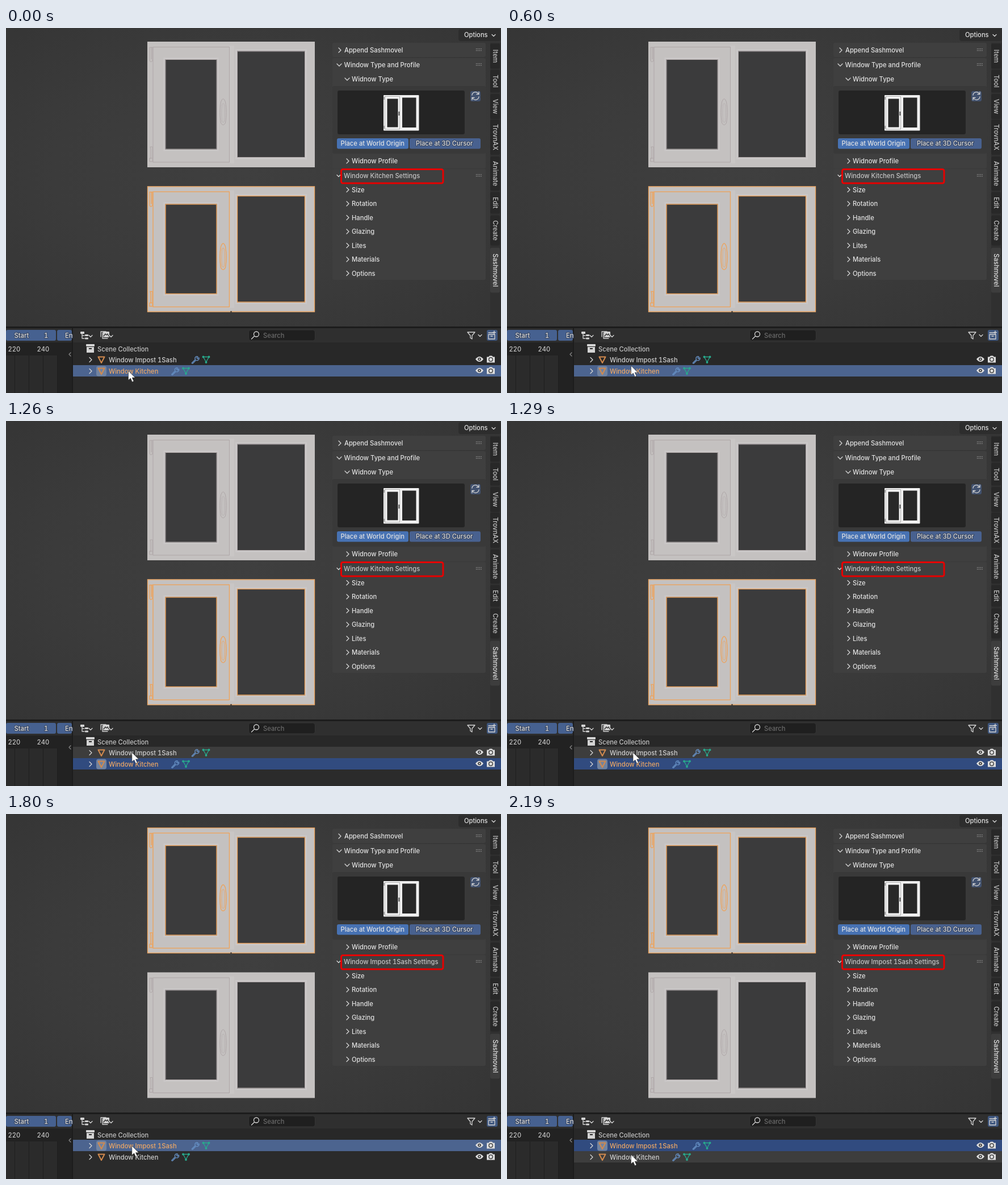
Animation of 872 by 642 pixels, one loop 2.22 s. Source, as an HTML page:

```html
<!DOCTYPE html>
<html lang="en">
<head>
<meta charset="utf-8">
<title>Window settings panel</title>
<style>
html, body { margin: 0; width: 100%; height: 100%; overflow: hidden; background: #3a3a3a; }
svg { display: block; width: 872px; height: 642px; }
text { font: 450 11.2px Inter, sans-serif; font-variant-numeric: tabular-nums; fill: #e2e2e2; white-space: pre; }
.dim { fill: #c4c4c4; }
.shaded { fill: #dcdcdc; stroke: #36445f; stroke-width: 2px; paint-order: stroke; }
.icon { fill: none; stroke: #d4d4d4; stroke-width: 1.3; stroke-linecap: round; stroke-linejoin: round; }
.edge { fill: none; stroke: #aea6a7; stroke-width: 1; }
.inner { opacity: .6; }
.outer, .origin { visibility: hidden; }
.selected .edge { stroke: #eca45f; stroke-width: 1.4; }
.selected .outer, .selected .origin { visibility: visible; }
.row .name { fill: #d0d0d0; }
.row .badge { visibility: hidden; }
.row.selected .name { fill: #eda765; }
.row.selected .badge { visibility: visible; }
</style>
</head>
<body>
<svg id="stage" viewBox="0 0 872 642" xmlns="http://www.w3.org/2000/svg">
  <defs>
    <radialGradient id="view" cx="48%" cy="48%" r="70%">
      <stop offset="0" stop-color="#3f3f3f"/><stop offset=".55" stop-color="#3b3b3b"/><stop offset="1" stop-color="#353535"/>
    </radialGradient>
  </defs>
</svg>
<script>
const stage = document.getElementById('stage');
const LOOP = 2220, STEP = 30, CLICK = 1320, ROW_SPLIT = 593.8;

function add(tag, attrs, parent = stage, content = '') {
  const el = document.createElementNS('http://www.w3.org/2000/svg', tag);
  for (const key in attrs) el.setAttribute(key, attrs[key]);
  el.textContent = content;
  parent.append(el);
  return el;
}
const rect = (x, y, width, height, fill, rx = 0, parent = stage) =>
  add('rect', { x, y, width, height, fill, rx }, parent);
const label = (x, middle, content, cls = '', parent = stage) =>
  add('text', { x, y: middle + 4, class: cls }, parent, content);
const icon = (d, stroke = '#d4d4d4', parent = stage) =>
  add('path', { d, class: 'icon', style: `stroke:${stroke}` }, parent);
const right = (x, y, parent = stage) => icon(`M${x - 2} ${y - 4}l4 4-4 4`, '#d4d4d4', parent);
const down = (x, y) => icon(`M${x - 4} ${y - 2}l4 4 4-4`);
const down3 = (x, y) => icon(`M${x - 3} ${y - 1.5}l3 3 3-3`);

function drawWindow(top) {
  const g = add('g', { transform: `translate(249 ${top})` });
  const edge = (x, y, width, height, cls = 'edge') =>
    add('rect', { x, y, width, height, class: cls }, g);
  rect(0, 0, 295, 221, '#c4c1c0', 0, g);
  rect(144, 7, 9, 207, '#c9c6c5', 0, g);
  for (const [x, y, w, h] of [[31.5, 31, 91, 158.5], [158, 16.5, 120, 187.5]]) {
    rect(x - 3, y - 3, w + 6, h + 6, '#cac7c7', 0, g);
    rect(x, y, w, h, '#3b3b3c', 0, g);
    edge(x + .5, y + .5, w - 1, h - 1);
  }
  edge(10, 9.5, 134.5, 202.5);
  edge(.5, .5, 294, 220, 'edge outer');
  for (const d of ['M4 10h5v24q-5 4-5-3zM7 10v21', 'M5 185h4v26h-5v-6h2v-16zM4 205h5',
    'M129.500 106q4-11 8 0c2 12 2 25 0 37q-4 7-8 0c-2-12-2-25 0-37z'])
    add('path', { d, class: 'edge' }, g);
  add('path', { d: 'M131.500 111q2-5 4 0c1 10 1 19 0 29q-2 4-4 0c-1-10-1-19 0-29z', class: 'edge inner' }, g);
  add('circle', { cx: 147.5, cy: 220.5, r: 1.3, fill: '#4b3b2d', class: 'origin' }, g);
  return g;
}

function drawGrip(y) {
  for (let i = 0; i < 8; i++) rect(828 + i % 4 * 2.8, y - 2.5 + (i >> 2) * 3, 1.3, 1.3, '#999');
}

function drawSidebar() {
  rect(797, 2, 75, 21, '#2d2d2d', 4);
  label(807, 12, 'Options');
  down3(859, 13);

  rect(853, 26, 19, 499, '#303030');
  const tabs = [['Item', 49.5, 44], ['Tool', 93.5, 40], ['View', 138, 44], ['TrovnAX', 192, 62],
    ['Animate', 256, 60], ['Edit', 307.5, 38], ['Create', 356, 53], ['Sashmovel', 426, 79]];
  tabs.forEach(([name, middle, size], i) => {
    const active = i === tabs.length - 1;
    rect(853, middle - size / 2, 17, size, active ? '#3d3d3d' : '#282828', 3);
    add('text', { transform: `translate(858 ${middle}) rotate(90)`, 'text-anchor': 'middle',
      class: active ? '' : 'dim' }, stage, name);
  });

  rect(575, 26, 270, 25, '#3f3f3f', 3);
  rect(575, 53, 270, 194, '#3f3f3f', 3);
  rect(575, 102, 270, 119, '#393939', 3);
  rect(575, 248, 270, 195, '#3f3f3f', 3);
  right(588, 39); label(596, 39, 'Append Sashmovel'); drawGrip(38.5);
  down(587, 65); label(595.5, 65, 'Window Type and Profile'); drawGrip(64.5);
  down(601, 90); label(609, 89.5, 'Widnow Type');

  rect(584, 110, 224, 77, '#242424', 3);
  rect(665, 118, 62.5, 62.5, '#f0f0f0', 1);
  rect(667, 120, 27, 58.5, '#b0b0b0');
  rect(668, 121, 25, 56.5, '#f5f5f5');
  rect(671.5, 124.5, 19, 50, '#282828');
  rect(698, 122.5, 24.5, 52.5, '#282828');
  rect(691.5, 147, 2, 7, '#555');
  rect(665.5, 121, 1.2, 5, '#888');
  rect(665.5, 172, 1.2, 5, '#888');
  rect(818, 111, 18, 18, '#42526f', 3);
  icon('M821 118a6 6 0 0 1 11-2.500M833 112.500v4h-4M833 121a6 6 0 0 1-11 2.500M821 126.500v-4h4');

  rect(583, 194, 126, 18.5, '#4772b3', 3);
  rect(711, 194, 125, 18.5, '#48618f', 3);
  label(589.5, 203, 'Place at World Origin');
  label(722, 203, 'Place at 3D Cursor', 'shaded');
  right(602, 234); label(609, 234, 'Widnow Profile');

  down3(586, 260); drawGrip(259.5);
  const title = label(595, 260, '', 'dim');
  ['Size', 'Rotation', 'Handle', 'Glazing', 'Lites', 'Materials', 'Options'].forEach((name, i) => {
    const y = 284.5 + i * 24.5;
    right(602, y);
    label(609, y, name);
  });
  add('rect', { x: 590.5, y: 248.5, width: 179.5, height: 24.5, rx: 3, fill: 'none', stroke: '#e60000', 'stroke-width': 3 });
  return title;
}

function drawTimeline() {
  rect(0, 525, 872, 117, '#1c1c1c');
  rect(0, 528, 116, 25, '#2e2e2e');
  rect(0, 531, 88, 19, '#466190', 3);
  rect(90, 531, 26, 19, '#466190', 3);
  label(14.5, 540.5, 'Start', 'shaded');
  label(67, 540.5, '1', 'shaded');
  label(104, 540.5, 'En', 'shaded');
  rect(0, 553, 116, 23, '#222222');
  rect(0, 576, 91, 66, '#2b2b2b');
  rect(91, 576, 25, 66, '#222222');
  for (const x of [15, 40, 65, 90]) rect(x, 576, 1, 66, '#1e1e1e');
  label(3.5, 565, '220', 'dim'); label(54.5, 565, '240', 'dim');
  icon('M114 571l-3 3 3 3', '#888');
}

function drawOutliner() {
  rect(118, 528, 754, 25, '#2f2f2f');
  rect(118, 553, 754, 89, '#282828');
  rect(118, 613, 754, 29, '#2b2b2b');
  rect(131, 534, 7, 4, '#d4d4d4', 1);
  icon('M134 538v8h4M134 541h4');
  rect(139, 539, 6, 3, '#d4d4d4', 1);
  rect(139, 544.5, 6, 3, '#d4d4d4', 1);
  down3(149, 542);
  icon('M170 536v10h9M167 534v9M167 534h9');
  rect(171, 534, 11, 10, '#d4d4d4', 1);
  icon('M172 542l3-4 2 2 2-2 2 4', '#333');
  down3(185, 542);
  add('rect', { x: 427.5, y: 531, width: 117, height: 19, rx: 4, fill: '#1f1f1f', stroke: '#353535' });
  add('circle', { cx: 441, cy: 538.5, r: 4.5, class: 'icon' });
  icon('M437.500 542l-5 5');
  add('text', { x: 453, y: 544.5, style: 'fill:#6a6a6a' }, stage, 'Search');
  icon('M813 535h13l-5 6v6l-3-2v-4z');
  down3(835, 541);
  rect(847, 531, 19, 19, '#3f577f', 3);
  icon('M850 536h9M850 539h11v8h-11zM854 542h3M860 533v5M857.500 535.500h5');

  rect(141, 556, 15, 4, '#d4d4d4', 1);
  add('path', { d: 'M142 561h13v10h-13zM146 563h5v2h-5z', fill: '#d4d4d4', 'fill-rule': 'evenodd' });
  label(161, 564.5, 'Scene Collection', 'dim');
}

function drawRow(top, name, toolX) {
  const g = add('g', { class: 'row', transform: `translate(0 ${top})` });
  const back = rect(118, -.5, 754, 20, '#282828', 0, g);
  right(149, 10, g);
  add('rect', { x: 159, y: 1, width: 18, height: 18, rx: 4, fill: '#7183a0', class: 'badge' }, g);
  icon('M162.500 5h11l-5.500 10.500z', '#d28a4e', g).style.strokeWidth = 2;
  label(181, 10, name, 'name', g);
  icon(`M${toolX - 5} 15.500l6-6a3.500 3.500 0 0 1 4.500-5l-2 2.200 1.500 1.500 2.200-2a3.500 3.500 0 0 1-5 4.500l-6 6q-2 0-1.200-1.200z`,
    '#6690c4', g);
  const x = toolX + 20;
  icon(`M${x - 5} 5h10l-5 9z`, '#28aa8d', g);
  for (const [dx, y] of [[-5, 5], [5, 5], [0, 14.5]])
    add('circle', { cx: x + dx, cy: y, r: 1.9, fill: '#28aa8d' }, g);
  add('path', { d: 'M827 9q7-9 14 0q-7 9-14 0z', fill: '#dedede' }, g);
  add('circle', { cx: 834, cy: 9, r: 2.8, fill: '#333' }, g);
  add('circle', { cx: 834, cy: 9, r: 1.2, fill: '#dedede' }, g);
  add('path', { d: 'M847 5h3l2-2h4l2 2h3v10h-14z', fill: '#dedede' }, g);
  add('circle', { cx: 854, cy: 9.5, r: 3.3, fill: '#dedede', stroke: '#333', 'stroke-width': 1.3 }, g);
  return { g, back };
}

rect(0, 0, 872, 525, 'url(#view)');
const frames = [drawWindow(24), drawWindow(278.5)];
const title = drawSidebar();
drawTimeline();
drawOutliner();
const names = ['Window Impost 1Sash', 'Window Kitchen'];
const rows = [drawRow(573.5, names[0], 332.5), drawRow(593.5, names[1], 297)];
const cursor = add('path', { d: 'M0 0V16.500L3.800 13 6.800 19.500 9.600 18.200 6.700 12H12z',
  fill: '#fff', stroke: '#222', 'stroke-width': .6 });

// time, x, y, easing power towards the next stop (negative eases out)
const path = [[0, 215.5, 603, 1.7], [600, 218.5, 594, -1.4], [840, 220.5, 583, 1], [1200, 221.5, 583, 1],
  [1290, 222, 583, 1], [1770, 222, 583, 1.2], [2010, 219.5, 591.5, 1], [2190, 218.5, 599, 1], [LOOP, 217.5, 601, 1]];

function cursorAt(t) {
  const i = path.findLastIndex(stop => stop[0] <= t);
  const [t0, x0, y0, power] = path[i], [t1, x1, y1] = path[i + 1];
  const p = (t - t0) / (t1 - t0);
  const k = power > 0 ? p ** power : 1 - (1 - p) ** -power;
  return [x0 + (x1 - x0) * k, y0 + (y1 - y0) * k];
}

function render(now) {
  const t = Math.floor(now % LOOP / STEP) * STEP;
  const [x, y] = cursorAt(t);
  const active = t < CLICK ? 1 : 0, hovered = y < ROW_SPLIT ? 0 : 1;
  cursor.setAttribute('transform', `translate(${x} ${y})`);
  title.textContent = names[active] + ' Settings';
  rows.forEach(({ g, back }, i) => {
    const on = i === active, hot = i === hovered;
    g.classList.toggle('selected', on);
    frames[i].classList.toggle('selected', on);
    back.setAttribute('fill', on ? (hot ? '#4c648f' : '#314b7f') : (hot ? '#3d3d3d' : i ? '#2b2b2b' : '#282828'));
  });
}

const start = performance.now();
function tick() {
  render(performance.now() - start);
  requestAnimationFrame(tick);
}
tick();
</script>
</body>
</html>
```
